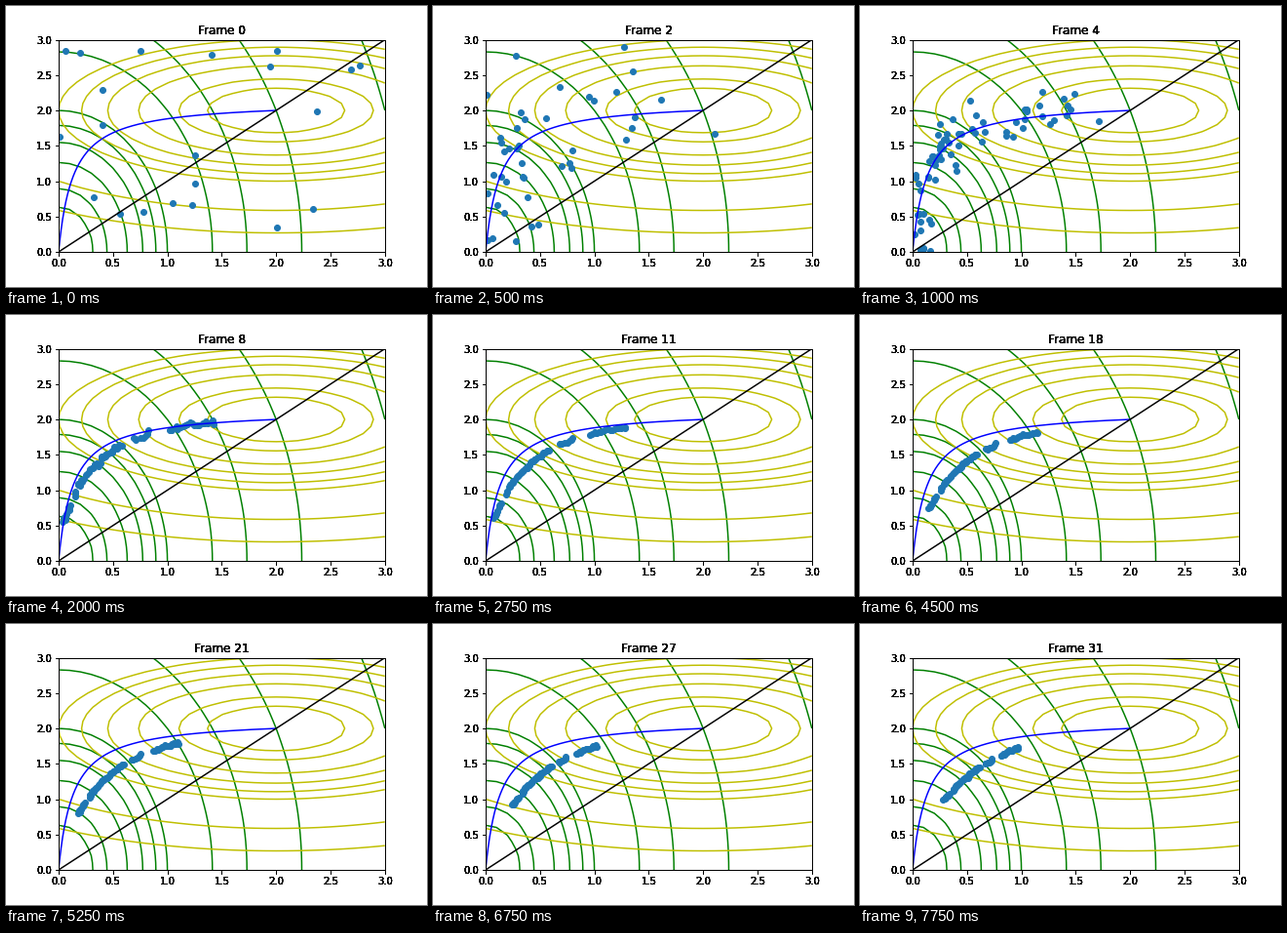
These frames come from a looping animation (432x288 px, 8000 ms). A matplotlib script:

```python
import numpy as np
import matplotlib.pyplot as plt
from matplotlib.animation import FuncAnimation

FRAMES, INTERVAL = 32, 250
W, H, DPI = 432, 288, 72
LEVELS = [0.1, 0.2, 0.4, 0.6, 0.8, 1, 2, 3, 5, 10]
TICKS = np.arange(0, 3.1, 0.5)
SETTLE, TIGHT = 4, 8    # generations: cloud near the curve, thin front
LAYERS = 8              # repeated axes give the text its heavy, hard edges

# Control points of the front, from the first thin one to the last
BEND_START = np.array([(0.05, 0.55), (0.25, 1.85), (1.42, 1.945)])
BEND_END = np.array([(0.287, 0.993), (0.52, 1.45), (0.967, 1.724)])

# Clusters along the front: start, end, number of points
CLUSTERS = [(0, 0.1, 10), (0.17, 0.56, 34), (0.63, 0.72, 8), (0.82, 1, 20)]

rng = np.random.default_rng(12)
start = rng.uniform(0, 3, (21, 2))
place = rng.permutation(np.concatenate(
    [np.linspace(a, b, n) for a, b, n in CLUSTERS]))
offset = rng.normal(0, (0.5, 1), (len(place), 2))


def pareto(lam):
    """Points that are best for a weighting of the two objectives."""
    return np.column_stack([2 * (1 - lam) / (1 + 3 * lam),
                            8 * (1 - lam) / (4 - 3 * lam)])


def front(s, t):
    """Bezier arc that shrinks and straightens."""
    p = np.clip((t - TIGHT) / (FRAMES - 1 - TIGHT), 0, 1)
    ease = np.array([[p], [p**0.6], [p**0.6]])
    bend = BEND_START + ease * (BEND_END - BEND_START)
    return np.column_stack([(1 - s)**2, 2 * s * (1 - s), s**2]) @ bend


def population(t):
    if t == 0:
        return start
    blend = np.clip((t - SETTLE) / (TIGHT - SETTLE), 0, 1)
    base = (1 - blend) * pareto(1 - 0.93 * place) + blend * front(place, t)
    spread = max(0.17 * 0.6**(t - SETTLE), 0.01)
    return np.abs(base + spread * offset)[:21 * t]


fig = plt.figure(figsize=(W / DPI, H / DPI), dpi=DPI, facecolor="white")


def add_axes():
    ax = fig.add_axes([0.125, 0.125, 0.775, 0.755])
    ax.set(xlim=(0, 3), ylim=(0, 3), xticks=TICKS, yticks=TICKS)
    return ax


layers = [add_axes() for _ in range(LAYERS)]
for layer in layers[1:]:
    layer.patch.set_visible(False)
titles = [layer.set_title("", fontsize=12) for layer in layers]

ax = layers[0]
grid = np.linspace(0, 3, 31)
X, Y = np.meshgrid(grid, grid)
ax.contour(X, Y, X**2 + Y**2 / 4, LEVELS, colors="g", linewidths=1.5)
ax.contour(X, Y, (X - 2)**2 / 4 + (Y - 2)**2, LEVELS, colors="y",
           linewidths=1.5)
dots, = ax.plot([], [], "o", color="C0", markersize=6)
ax.plot(*pareto(np.linspace(0, 1, 200)).T, "b")
ax.plot([0, 3], [0, 3], "k")


def update(t):
    dots.set_data(*population(t).T)
    for title in titles:
        title.set_text(f"Frame {t}")
    return [dots, *titles]


anim = FuncAnimation(fig, update, frames=FRAMES, interval=INTERVAL,
                     repeat=True, blit=False)
plt.show()
```
